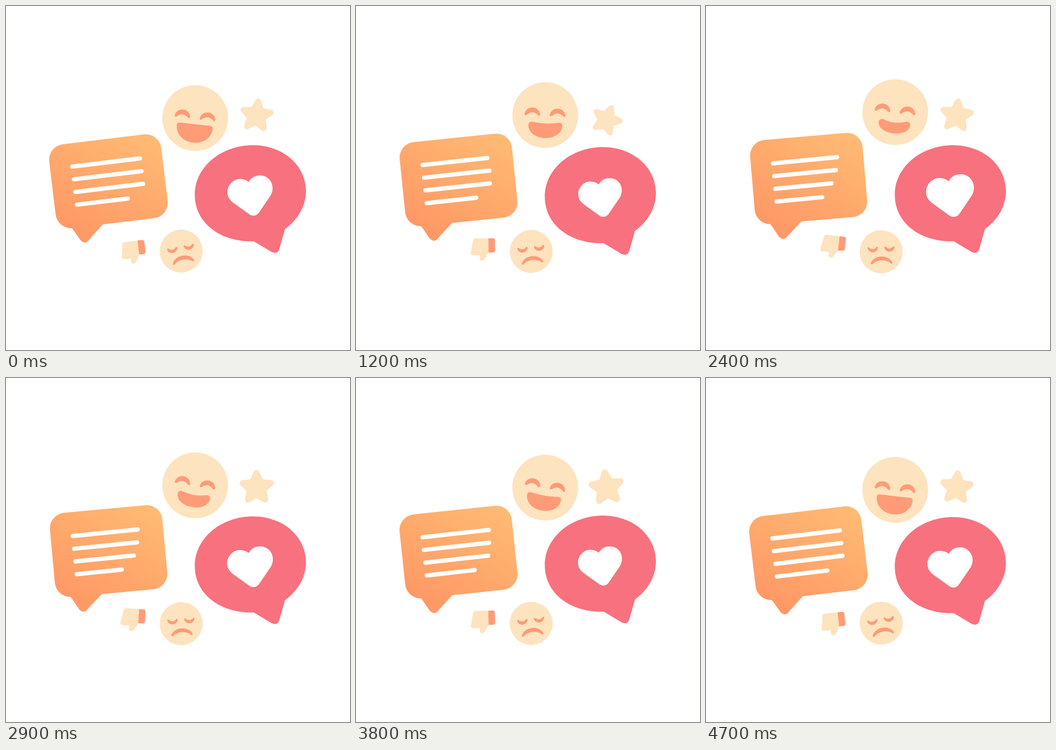
An HTML page for the animation above (4.8 s loop, 640 px wide and 640 px high).

```html
<!DOCTYPE html>
<html lang="en">
<head>
<meta charset="utf-8">
<title>Feedback</title>
<style>
html, body { margin: 0; width: 100%; height: 100%; overflow: hidden; background: #fff; }
svg { display: block; width: 100%; height: 100%; }
.cream { fill: #fee3bf; }
.coral { fill: #ff9b77; }
.pink { fill: #f8717e; }
.white { fill: #fff; }
#lines { stroke: #fff; stroke-width: 8; stroke-linecap: round; }
#star { stroke: #fee3bf; stroke-width: 11; stroke-linejoin: round; }
</style>
</head>
<body>
<svg viewBox="0 0 640 640">
  <defs>
    <linearGradient id="warm" gradientUnits="userSpaceOnUse" x1="75" y1="-78" x2="-55" y2="95">
      <stop offset="0" stop-color="#ffba73"/>
      <stop offset="1" stop-color="#ff9966"/>
    </linearGradient>
    <path id="eye" d="M-14.5 5C-11 -10.5 11 -10.5 14.5 5C15 8.5 12 9 10 7C4 .8 -4 .8 -10 7C-12 9 -15 8.5 -14.5 5Z"/>
  </defs>

  <g id="card">
    <g transform="translate(190.6 326) rotate(-6.9)">
      <path fill="url(#warm)" d="M-76 -78.5H76A29 29 0 0 1 105 -49.5V49.5A29 29 0 0 1 76 78.5H-20L-48 103Q-56.5 113 -64.5 103L-78 78.5A29 29 0 0 1 -105 49.5V-49.5A29 29 0 0 1 -76 -78.5Z"/>
      <g id="lines"></g>
    </g>
  </g>

  <g id="bubble">
    <path class="pink" d="M351.3 352C351.3 300 400 259.5 460 259.5C514 259.5 558 296 558 345C558 373 543 398 519 415.5L508.7 452Q505.5 463 494.5 458.3L461 438.3C400 440 351.3 405 351.3 352Z"/>
    <path id="heart" class="white" d="M451.5 328C457 318.5 465 315.5 473 315.8C487 316 496.5 327.5 496 340.5C495.5 347 493.5 351.5 491 355L470.5 385Q464 393.5 454 389L424 367.5C415.5 361.5 411.5 354 412 345.5C412.5 333.5 423 322.3 435 322.3C442 322.3 447.5 324.5 451.5 328Z"/>
  </g>

  <g id="happy">
    <circle class="cream" r="61.2"/>
    <g id="grin" class="coral">
      <use href="#eye" x="-24" y="-6.6"/>
      <use href="#eye" x="23" y="-6.4"/>
      <path id="mouth" transform="translate(1 0)"/>
    </g>
  </g>

  <g id="sad">
    <g transform="translate(326 456) rotate(-11)">
      <circle class="cream" r="40"/>
      <g class="coral">
        <use href="#eye" transform="translate(-15.6 -4) scale(.66 -.66)"/>
        <use href="#eye" transform="translate(15.6 -4) scale(.66 -.66)"/>
        <path d="M-20 20C-13 5 13 5 20 20Q20.3 24 17 22.5C9 13.8 -9 13.8 -17 22.5Q-20.3 24 -20 20Z"/>
      </g>
    </g>
  </g>

  <g id="thumb">
    <path class="cream" d="M247 432H222Q218.6 432 218 435L213.5 459Q213 463.3 217 463.5L229 463.9Q231 464 230.5 466L230 470Q230.5 474 234.5 473.8Q238 473.5 239 471L247 458.5Z"/>
    <path class="coral" d="M246.5 432H254.5Q258.7 432 258.7 436.5V454Q258.7 458.5 254.5 458.5H246.5Z"/>
  </g>

  <polygon id="star" class="cream"/>
</svg>
<script>
const LOOP = 4800, STEP = 100, LEFT = -63.3;
const el = id => document.getElementById(id);
const move = (id, value) => el(id).setAttribute("transform", value);

// Straight fall from 0 at `from` to 1 at `peak`, then back to 0 at the end of the loop.
const dip = (t, from, peak) =>
  Math.max(0, Math.min((t - from) / (peak - from), (LOOP - t) / (LOOP - peak)));

// Zigzag 0, 1, -1, 0 with its turns at `peak` and as far from the end.
const zigzag = (t, peak) => {
  if (t < peak) return t / peak;
  if (t > LOOP - peak) return (t - LOOP) / peak;
  return (LOOP / 2 - t) / (LOOP / 2 - peak);
};

function mouthPath(p) {
  const w = 33.8 - 4.2 * p, top = 11.5 + 3.5 * p, sag = 9 * p;
  const r = 5 + 2 * p, side = top + r, bend = w * .93;
  const low = (46 - 6.5 * p - side / 4) / .75;
  return `M${r - w} ${top}Q0 ${top + sag} ${w - r} ${top}Q${w} ${top} ${w} ${side}` +
    `C${bend} ${low} ${-bend} ${low} ${-w} ${side}Q${-w} ${top} ${r - w} ${top}Z`;
}

const rows = [8.5, 12.8, 22, 12].map((shrink, i) => {
  const line = document.createElementNS("http://www.w3.org/2000/svg", "line");
  const y = 23.8 * i - 35.1;
  line.setAttribute("x1", LEFT);
  line.setAttribute("y1", y);
  line.setAttribute("y2", y);
  el("lines").append(line);
  return {
    line, shrink,
    length: i < 3 ? 126.5 : 95,
    from: i ? 750 : 0,
    peak: 1800 + 300 * i
  };
});

el("star").setAttribute("points", Array.from({ length: 10 }, (_, i) => {
  const r = i % 2 ? 13 : 27.5, a = i * Math.PI / 5;
  return [r * Math.sin(a), -r * Math.cos(a)].map(n => n.toFixed(2));
}).join(" "));

function draw(t) {
  const p = dip(t, 0, LOOP / 2);
  const quarter = zigzag(t, LOOP / 4), third = zigzag(t, LOOP / 3);

  move("card", `rotate(${2 * p} 336 335)`);
  move("lines", `rotate(${-.6 * p} 60 0)`);
  for (const { line, length, shrink, from, peak } of rows)
    line.setAttribute("x2", LEFT + length - shrink * dip(t, from, peak));

  const beat = .965 + (1 - Math.abs(quarter)) * (.035 + .06 * p);
  move("bubble", `translate(0 ${3.6 * quarter - .5})`);
  move("heart", `translate(454 353.3) scale(${beat}) translate(-454 -353.3)`);

  move("happy", `translate(352 ${208.5 - 11 * p})`);
  move("grin", `rotate(${6.4 - 5.3 * third})`);
  el("mouth").setAttribute("d", mouthPath(p));

  move("sad", `rotate(${9 * p} 318 456)`);
  move("thumb", `rotate(${13.5 * p - 7} 280 449)`);

  const starY = 204.1 + 8.1 * Math.max(0, quarter);
  move("star", `translate(466.2 ${starY}) rotate(${6 + 15 * quarter}) scale(${.975 - .075 * quarter})`);
}

const start = performance.now();
function tick() {
  const t = (performance.now() - start) % LOOP;
  draw(Math.floor(t / STEP) * STEP);
  requestAnimationFrame(tick);
}
tick();
</script>
</body>
</html>
```
